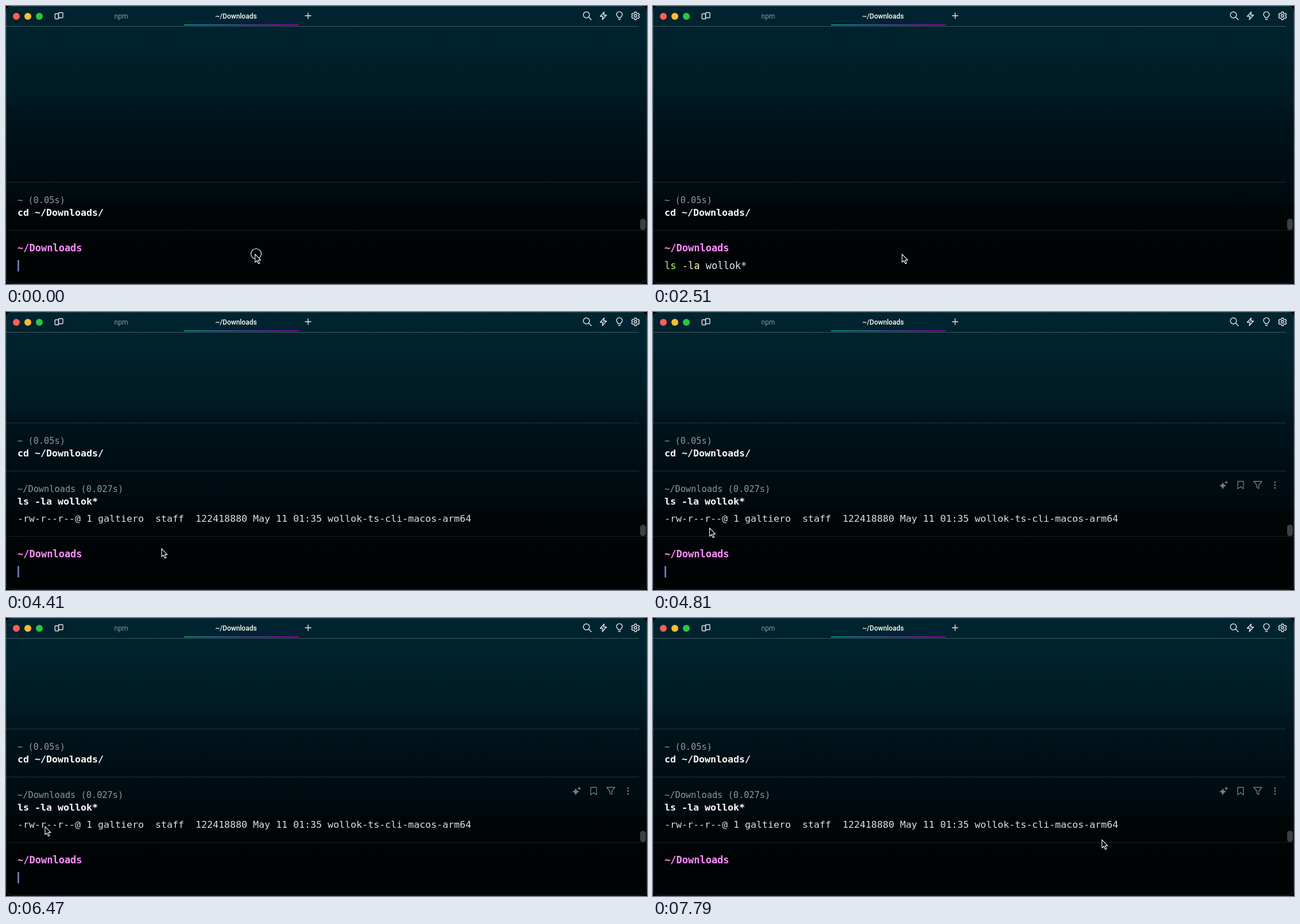
These frames come from a looping animation (1116 px wide and 485 px high, 7.99 s). An HTML page:

```html
<!DOCTYPE html>
<html lang="en">
<head>
<meta charset="utf-8">
<title>Terminal</title>
<style>
html, body { margin: 0; width: 100%; height: 100%; overflow: hidden; background: #000; }
#stage {
  position: relative; width: 1116px; height: 485px; overflow: hidden; border-radius: 10px;
  background: linear-gradient(#002430 0, #00212c 80px, #001e28 110px, #001922 165px, #00151d 185px, #000f15 250px, #000a0e 344px, #000508 346px, #000304 485px);
}
#stage::after {
  content: ""; position: absolute; inset: 0 0 1px; border-radius: 10px;
  border: 1px solid rgba(255, 255, 255, .15);
}
svg { position: absolute; left: 0; top: 0; }
text, #input { font-family: "DejaVu Sans Mono", monospace; white-space: pre; }
.tab { font: 12px Roboto, sans-serif; text-anchor: middle; fill: #8d999d; }
.active { font-weight: 500; fill: #fff; }
.info { font-size: 15.3px; fill: #91979a; }
.cmd { font-size: 16.61px; font-weight: bold; fill: #fff; }
.out { font-size: 16.61px; fill: #dfe1e2; }
.prompt { font-size: 17px; font-weight: bold; fill: #ff8ffd; }
.rule { fill: #fff; opacity: .14; }
.icon { fill: none; stroke: #e4e9eb; stroke-width: 1.4; stroke-linejoin: round; stroke-linecap: round; }
.tools { stroke: #777e81; stroke-width: 1.3; }
.tools .solid { fill: #777e81; stroke: none; }

#input { position: absolute; left: 20px; top: 443px; font-size: 17px; line-height: 20px; }
#input div { position: absolute; top: 0; height: 20px; }
#ghost { left: 0; color: #666d70; }
#typed { left: 0; }
#typed span { display: block; width: 100%; overflow: hidden; color: #e6e7e8; }
#typed i { font-style: normal; color: #b4fa72; }
#typed i + i { color: #fefdc2; }
#caret { left: 100%; width: 3px; background: #6075b0; }

#ring, #ghost, #typed, #caret, #first, #second, #tools { animation: 7990ms step-end infinite; }
#ring { animation-name: ring; }
#ghost { animation-name: ghost; }
#typed { animation-name: type; }
#caret { animation-name: blink; }
#first { animation-name: scroll; }
#second { animation-name: output; }
#tools { animation-name: hover; }
#pointer { animation: point 7990ms linear infinite; }

@keyframes ring { 0% { opacity: 1 } .75%, 100% { opacity: 0 } }
@keyframes ghost { 0% { opacity: 0 } 16.645% { opacity: 1 } 24.78%, 100% { opacity: 0 } }
@keyframes type {
  0% { width: 0 }
  16.27% { width: 1ch }
  17.897% { width: 2ch }
  19.524% { width: 3ch }
  21.401% { width: 4ch }
  21.777% { width: 5ch }
  24.78% { width: 14ch }
  41.802%, 100% { width: 0 }
}
@keyframes blink {
  0%, 11.514%, 37.421%, 54.568%, 66.958%, 78.723%, 90.863% { opacity: 1 }
  5.131%, 31.414%, 48.56%, 60.575%, 72.966%, 84.856%, 96.871%, 100% { opacity: 0 }
}
@keyframes scroll { 0% { transform: translateY(114px) } 42.177%, 100% { transform: none } }
@keyframes output { 0% { opacity: 0 } 42.177%, 100% { opacity: 1 } }
@keyframes hover { 0% { opacity: 0 } 59.574%, 100% { opacity: 1 } }
@keyframes point {
  0% { transform: translate(433px, 432px) }
  54.2% { transform: translate(433px, 432px); animation-timing-function: ease-out }
  56.946%, 58.83% { transform: translate(126px, 394px) }
  60.2% { transform: translate(98px, 376px) }
  60.575%, 62.1% { transform: translate(95px, 375px) }
  67.334%, 71.1% { transform: translate(70px, 364px) }
  71.464% { transform: translate(69px, 364px) }
  73.592%, 80.6% { transform: translate(66px, 363px) }
  84.856%, 87.359% { transform: translate(81px, 361px) }
  90.863% { transform: translate(104px, 364px) }
  95.4% { transform: translate(104px, 364px); animation-timing-function: ease-in-out }
  97.496%, 100% { transform: translate(781px, 386px) }
}
</style>
</head>
<body>
<div id="stage">
  <svg width="1116" height="485">
    <defs>
      <linearGradient id="glow"><stop stop-color="#008f88"/><stop offset="1" stop-color="#8c009c"/></linearGradient>
    </defs>

    <circle cx="18" cy="18" r="6" fill="#ff5f57"/>
    <circle cx="38" cy="18" r="6" fill="#febc2e"/>
    <circle cx="58" cy="18" r="6" fill="#28c840"/>
    <g class="icon">
      <path d="M91.5 22.5h-5q-1.200 0-1.200-1.200v-6.600q0-1.200 1.200-1.200h5z"/>
      <rect x="91.5" y="11.500" width="7.500" height="9" rx="1.200"/>
      <path d="M526 12v10M521 17h10"/>
      <circle cx="1010.500" cy="15.500" r="5.300"/>
      <path d="M1014.500 19.500l4.500 4.500"/>
      <path d="M1041.500 10.500l-7 7.500h4.700l-1 5.800 7.300-8h-5z"/>
      <path d="M1066 20.500c0-2-3-2.500-3-5.600a5 5 0 0 1 10 0c0 3.100-3 3.600-3 5.600zM1066.300 23.500h3.400"/>
      <circle cx="1096" cy="17" r="2.200"/>
      <path d="M1094.600 10.500h2.800l.5 2 1.500.9 2-.6 1.400 2.400-1.500 1.400v1l1.500 1.500-1.400 2.400-2-.6-1.500.9-.5 2h-2.800l-.5-2-1.500-.9-2 .6-1.400-2.400 1.500-1.500v-1l-1.500-1.400 1.400-2.400 2 .6 1.500-.9z"/>
    </g>
    <text class="tab" x="200.500" y="21.500">npm</text>
    <text class="tab active" x="400.500" y="21.500">~/Downloads</text>
    <rect x="310" y="32" width="200" height="2" fill="url(#glow)"/>
    <rect class="rule" y="35" width="1102" height="1" style="opacity:.24"/>

    <g id="first">
      <rect class="rule" y="193" width="1102" height="1"/>
      <text class="info" x="20" y="230">~ (0.05s)</text>
      <text class="cmd" x="20" y="252">cd ~/Downloads/</text>
    </g>
    <g id="second">
      <rect class="rule" y="277" width="1102" height="1"/>
      <text class="info" x="20" y="314">~/Downloads (0.027s)</text>
      <text class="cmd" x="20" y="336">ls -la wollok*</text>
      <text class="out" x="20" y="366">-rw-r--r--@ 1 galtiero  staff  122418880 May 11 01:35 wollok-ts-cli-macos-arm64</text>
    </g>
    <g id="tools" class="icon tools">
      <path class="solid" d="M992 297l2 4 4 2-4 2-2 4.500-2-4.500-4-2 4-2zM998 294l1 2.200 2.500 1-2.500 1-1 2.300-1-2.300-2.300-1 2.300-1z"/>
      <path d="M1018 295.500h10v13l-5-3.800-5 3.800z"/>
      <path d="M1046 295.500h14l-5.300 6.500v6l-3.400-2v-4z"/>
      <g class="solid">
        <circle cx="1083" cy="297" r="1.400"/>
        <circle cx="1083" cy="302" r="1.400"/>
        <circle cx="1083" cy="307" r="1.400"/>
      </g>
    </g>

    <rect class="rule" y="391" width="1116" height="1" style="opacity:.1"/>
    <rect x="1104" y="371" width="10" height="20" rx="5" fill="#3b4042"/>
    <text class="prompt" x="20" y="428">~/Downloads</text>
  </svg>

  <div id="input">
    <div id="ghost">ls -la wollok*</div>
    <div id="typed"><span><i>ls</i> <i>-la</i> wollok*</span><div id="caret"></div></div>
  </div>

  <svg width="1116" height="485">
    <circle id="ring" cx="435.500" cy="432.500" r="9" fill="none" stroke="#fff" stroke-width="1.200"/>
    <path id="pointer" d="M.6.800v14.400l3.300-3 2.500 5.500 2.300-1-2.500-5.300h4.300z" fill="#000" stroke="#fff" stroke-width="1.100" stroke-linejoin="round"/>
  </svg>
</div>
</body>
</html>
```
